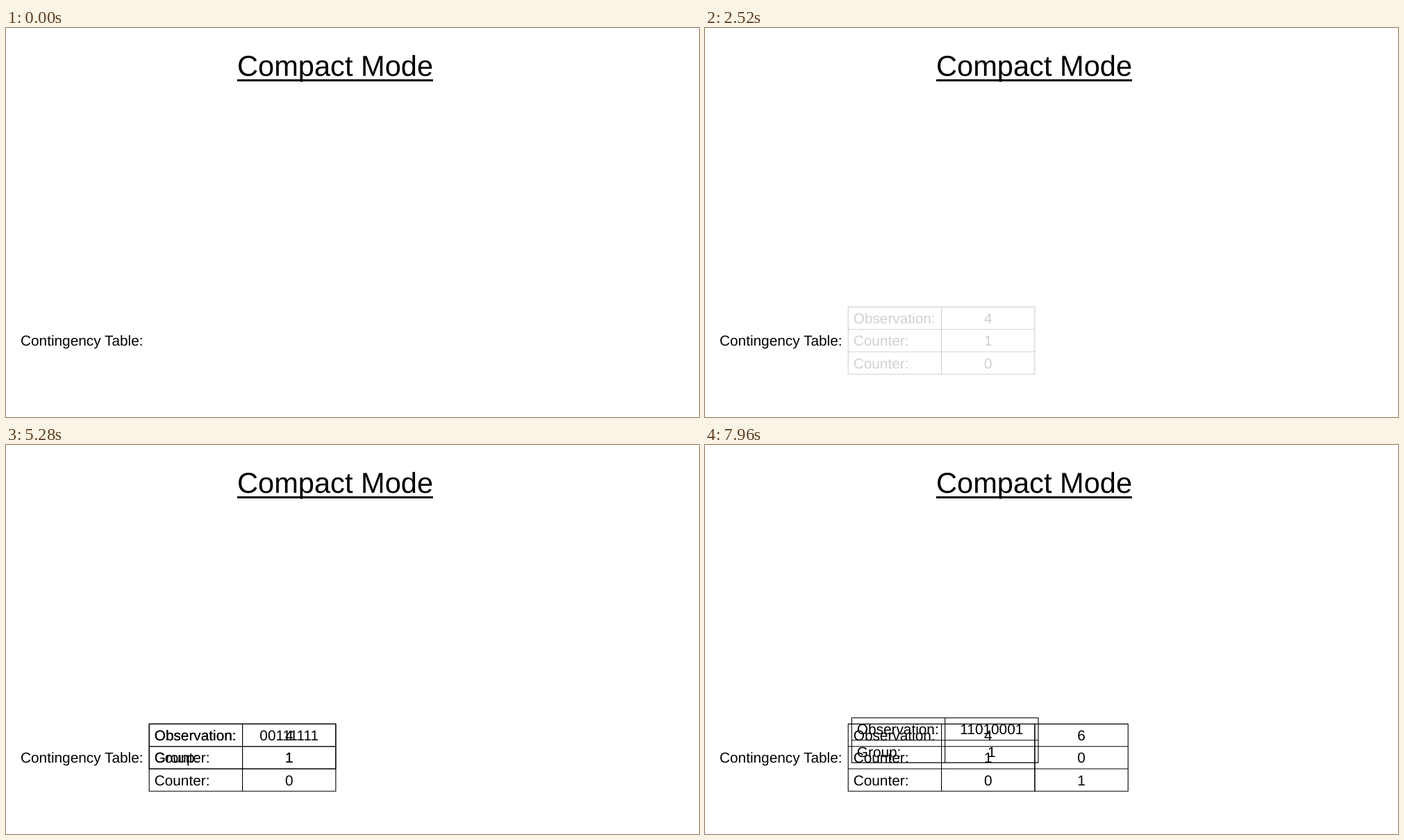
Animation, 998 px wide and 561 px high, one loop 8 s. Source, as an HTML page:

```html
<!DOCTYPE html>
<html lang="en">
<head>
<meta charset="utf-8">
<title>Compact Mode</title>
<style>
  html, body { margin: 0; width: 100%; height: 100%; overflow: hidden; background: #fff; }
  svg { display: block; font: 20.8px "Liberation Sans", Arial, sans-serif; text-rendering: geometricPrecision; }
  path { stroke: #000; stroke-width: 1.1; fill: none; }
</style>
</head>
<body>
<svg id="stage" width="998" height="561" viewBox="0 0 998 561">
  <text x="333" y="69.4" font-size="41.6">Compact Mode</text>
  <rect x="333" y="74" width="282" height="3"/>
  <text x="21" y="458.4">Contingency Table:</text>
</svg>
<script>
const LOOP = 8000, OFFSET = 10, CYCLE = 2920;
const APPEAR = 600, MOVE_START = 602, MOVE_TIME = 1750, MERGE = 2420;
const COL = 134.35, ROW = 32.3;
const START = { x: 340.4, y: 167.5 }, HOME = { x: 206.2, y: 402.4 };
const stage = document.getElementById("stage");

function add(parent, tag, attributes, text = "") {
  const node = document.createElementNS("http://www.w3.org/2000/svg", tag);
  for (const name in attributes) node.setAttribute(name, attributes[name]);
  node.textContent = text;
  parent.append(node);
  return node;
}

// Draws columns of cells; `first` is the index of the leftmost column.
function table(columns, first = 0) {
  const group = add(stage, "g", {});
  const rows = columns[0].length;
  const left = first * COL, right = left + columns.length * COL;
  let lines = "";
  for (let r = 0; r <= rows; r++) lines += `M${left - 0.5} ${r * ROW}H${right + 0.5}`;
  for (let c = 0; c <= columns.length; c++) lines += `M${left + c * COL} 0V${rows * ROW}`;
  add(group, "path", { d: lines });
  columns.forEach((cells, c) => cells.forEach((text, r) => {
    const isLabel = first + c === 0;
    add(group, "text", {
      x: isLabel ? 7.5 : left + (c + 0.5) * COL,
      y: r * ROW + 23.8,
      "text-anchor": isLabel ? "start" : "middle"
    }, text);
  }));
  place(group, HOME);
  return group;
}

function place(group, { x, y }) {
  group.setAttribute("transform", `translate(${x} ${y})`);
}

const clamp = v => Math.min(1, Math.max(0, v));
const ease = u => u < 0.5 ? 2 * u * u : 1 - 2 * (1 - u) ** 2;
const mix = (a, b, p) => a + (b - a) * p;

const results = [
  table([["Observation:", "Counter:", "Counter:"], ["4", "1", "0"]]),
  table([["6", "0", "1"]], 2)
];
const samples = [["11010001", "0"], ["00111111", "1"], ["11010001", "1"]]
  .map(values => table([["Observation:", "Group:"], values]));

function draw(time) {
  const t = time % LOOP - OFFSET;
  samples.forEach((sample, i) => {
    const local = t - i * CYCLE;
    const p = ease(clamp((local - MOVE_START) / MOVE_TIME));
    place(sample, { x: mix(START.x, HOME.x, p), y: mix(START.y, HOME.y, p) });
    sample.setAttribute("opacity", local < MERGE ? clamp(local / APPEAR) : 0);
  });
  results.forEach((result, i) => {
    const local = t - i * CYCLE;
    result.setAttribute("opacity", clamp((local - MERGE) / (CYCLE - MERGE)));
  });
}

const began = performance.now();
function tick() {
  draw(performance.now() - began);
  requestAnimationFrame(tick);
}
tick();
</script>
</body>
</html>
```
